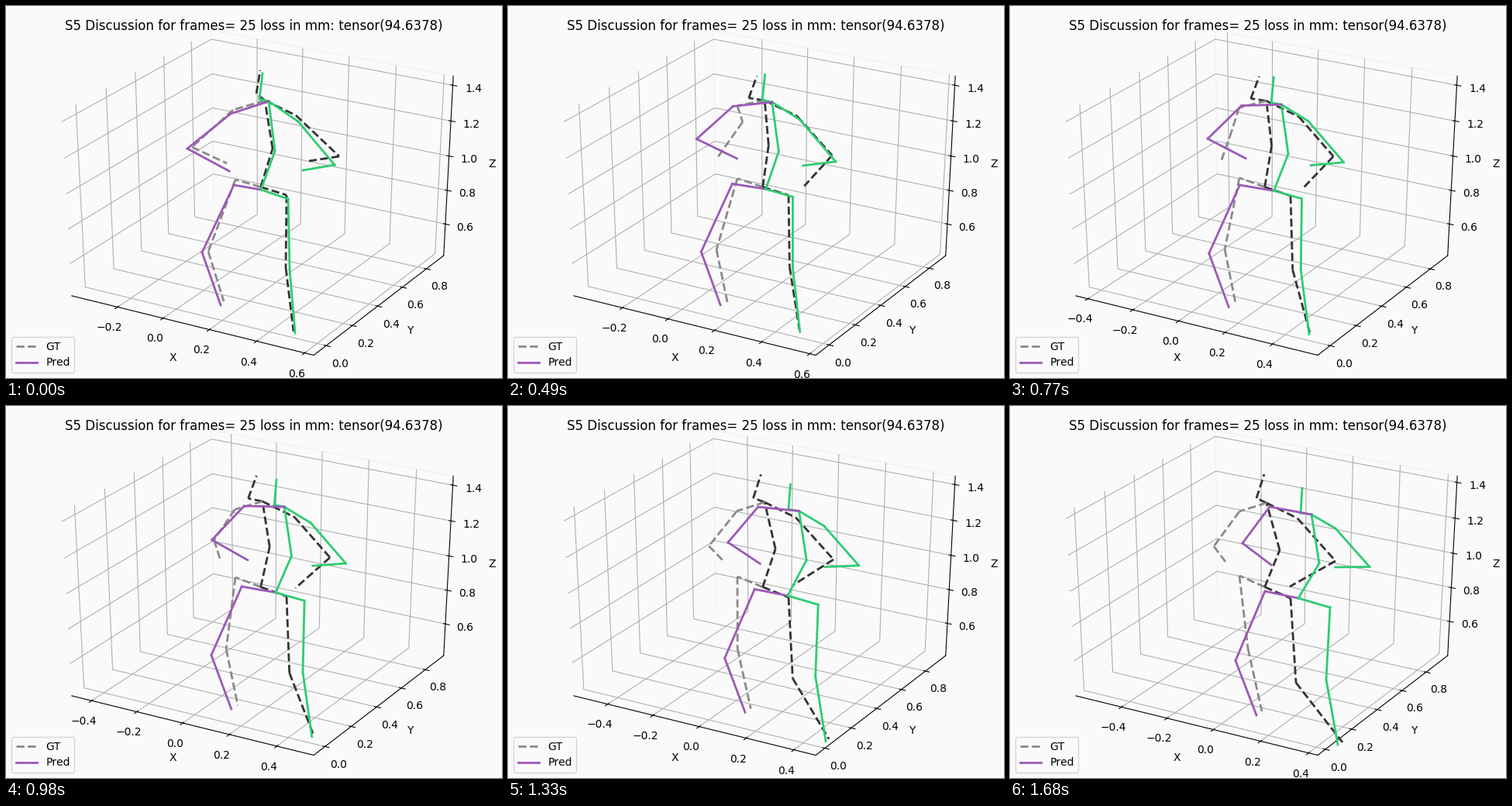
A matplotlib script for the animation above (1750 ms loop, 640 px wide and 480 px high).

```python
import numpy as np
import matplotlib.pyplot as plt
from matplotlib.animation import FuncAnimation
from matplotlib.lines import Line2D

W, H, FRAMES, STEP = 640, 480, 25, 70
PAPER, GRID, PANE = "#fafafa", "#b0b0b0", "#f2f2f2"
BLACK, GRAY, GREEN, PURPLE = "#333333", "#8a8a8a", "#2ecc71", "#9b59b6"
plt.rcParams["text.kerning_factor"] = 6

# Perspective camera looking at a unit cube
ELEV, AZIM, DIST = np.radians(30), np.radians(-60), 10
SE, CE, SA, CA = np.sin(ELEV), np.cos(ELEV), np.sin(AZIM), np.cos(AZIM)
RIGHT = np.array([-SA, CA, 0])
UP = np.array([-CA * SE, -SA * SE, CE])
TOWARD = np.array([CA * CE, SA * CE, SE])
ZOOM = DIST / 1.85
CENTER = np.array([W * 0.95 / 1.85, H - H * 0.95 / 1.85])

# Cube half size and label distances, in cube units
EDGE = 0.5 + 1 / 48
POINT = 48 / (72 * (W + H) / 100) / 12
TICK_PAD, LABEL_PAD = 11.5 * POINT, 25 * POINT
TICK_IN, TICK_OUT = 0.1 / 12, 0.2 / 12

# Signs of the corners each grid line runs through; the first is the axis edge
FOLDS = [
    [(0, -1, -1), (0, 1, -1), (0, 1, 1)],
    [(1, 0, -1), (-1, 0, -1), (-1, 0, 1)],
    [(1, 1, 0), (-1, 1, 0), (-1, -1, 0)],
]
TICK_DIM = [1, 0, 0]
TICK_FIFTHS = [range(-3, 5), range(-1, 6), range(2, 8)]

# Progress through the loop and two humps that start and end at zero
TIME = np.linspace(0, 1, FRAMES)[:, None]
LAG = 6.75 * TIME * (1 - TIME) ** 2
SWING = np.sin(np.pi * TIME * (2 - TIME)) ** 2


def move(start, drift, bend, hump=LAG):
    """Steady drift from a start point, bent aside by a hump."""
    return np.array(start) + TIME * drift + hump * bend


def spread(values, n):
    """Stretch a few vectors evenly over the n joints of a limb."""
    values = np.atleast_2d(values)
    at = np.linspace(0, 1, n)
    keys = np.linspace(0, 1, len(values))
    return np.column_stack([np.interp(at, keys, v) for v in values.T])


def limb(parent, starts, drifts, bends, hump=LAG):
    n = len(starts)
    return [parent] + [move(s, d, b, hump) for s, d, b
                       in zip(starts, spread(drifts, n), spread(bends, n))]


def project(points):
    p = np.atleast_2d(points)
    depth = DIST - p @ TOWARD
    return (CENTER[0] + W * ZOOM * (p @ RIGHT) / depth,
            CENTER[1] - H * ZOOM * (p @ UP) / depth)


def on_edge(signs, axis, value, size=EDGE):
    p = np.array(signs, float) * size
    p[axis] = value
    return p


# Data coordinates of the cube's middle
middle = move((0.1166, 0.428, 0.930), (-0.2, 0.036, 0), (0.046, -0.018, 0))
middle[:, 2:] -= 0.016 * TIME ** 6


def truth():
    root = move(CENTER, (0, 0), (0, 0))
    spine = limb(root, [(344, 184), (334, 122), (323, 113), (328, 83)],
                 [(4, 2), (-3, 3), (-5, 6), (0, 5)],
                 [(-9, -5), (-2, -1), (-11, 4), (-7, 6)])
    neck = spine[2]
    return [
        (GRAY, limb(root, [(296, 224), (261, 317), (281, 381)],
                    [(0, -5), (46, -4), (44, 13)], [(0, 0), (-11, -3)])),
        (BLACK, limb(root, [(362, 244), (361, 338), (371, 420)],
                     [(0, 4), (8, 19), (58, 14)], [(0, -1), (0, -7), (-12, -6)])),
        (BLACK, spine),
        (BLACK, limb(neck, [(374, 141), (430, 194), (391, 200)],
                     [(-3, 4), (-10, 6), (-30, 33)], [(0, 0), (-9, -3), (0, 23)])),
        (GRAY, limb(neck, [(293, 134), (240, 182), (285, 203)],
                    [(3, 2), (23, -1), (-7, -2)],
                    [(2, -6), (56, -32), (-14, -5)], SWING)),
    ]


def guess():
    root = move((329, 237), (43, 11), (-9, -4))
    spine = limb(root, [(347, 187), (339, 123), (327, 120), (331, 87)],
                 [(52, 16), (46, 19)], (-13, -4))
    neck = spine[2]
    return [
        (PURPLE, limb(root, [(294, 231), (253, 318), (277, 386)],
                      [(35, 8), (41, 13)], (-15, -4))),
        (GREEN, limb(root, [(364, 249), (366, 340), (373, 422)],
                     [(49, 11), (42, 13), (50, 15)], (-11, -6))),
        (GREEN, spine),
        (GREEN, limb(neck, [(377, 149), (424, 205), (383, 212)],
                     [(43, 9), (37, -4)], (-13, -5))),
        (PURPLE, limb(neck, [(290, 139), (234, 184), (288, 213)],
                      [(45, -9), (66, -7), (49, -8)], [(-13, -7), (-7, -14)])),
    ]


fig = plt.figure(figsize=(W / 100, H / 100), dpi=100, facecolor=PAPER)
ax = fig.add_axes([0, 0, 1, 1])
ax.set(xlim=(0, W), ylim=(H, 0))
ax.axis("off")


def stroke(xs, ys, color, width, z, style="-", cap="butt"):
    line = Line2D(xs, ys, color=color, lw=width, ls=style, zorder=z,
                  solid_capstyle=cap)
    ax.add_line(line)
    return line


def draw_box():
    back = np.array([(-1, 1, -1), (-1, 1, 1), (1, 1, 1)]) * EDGE
    stroke(*project(back), PANE, 1, 0)
    for axis, name in enumerate("XYZ"):
        signs = FOLDS[axis][0]
        ends = [on_edge(signs, axis, v) for v in (-EDGE, EDGE)]
        stroke(*project(ends), "black", 0.8, 2, cap="projecting")
        x, y = project(on_edge(signs, axis, 0, EDGE + LABEL_PAD))
        ax.text(x[0], y[0], name, ha="center", va="center", fontsize=10)


def make_ticks():
    ticks = []
    for axis, fifths in enumerate(TICK_FIFTHS):
        for n in fifths:
            label = f"{n / 5:.1f}".replace("-", "\u2212")
            ticks.append((
                axis, n / 5,
                stroke([], [], GRID, 0.8, 1),
                stroke([], [], "black", 0.8, 2, cap="projecting"),
                ax.text(0, 0, label, ha="center", va="top", fontsize=10),
            ))
    return ticks


def make_bones():
    return [(a, b, stroke([], [], color, 2, 3, style, "projecting"))
            for figure, style in ((truth(), "--"), (guess(), "-"))
            for color, joints in figure
            for a, b in zip(joints, joints[1:])]


def place_tick(tick, center):
    axis, value, grid, mark, label = tick
    t = value - center[axis]
    shown = abs(t) <= 0.5
    for artist in (grid, mark, label):
        artist.set_visible(shown)
    if not shown:
        return
    fold = FOLDS[axis]
    grid.set_data(*project([on_edge(s, axis, t) for s in fold]))
    inner, outer = on_edge(fold[0], axis, t), on_edge(fold[0], axis, t)
    dim = TICK_DIM[axis]
    inner[dim] -= TICK_IN * fold[0][dim]
    outer[dim] += TICK_OUT * fold[0][dim]
    mark.set_data(*project([inner, outer]))
    x, y = project(on_edge(fold[0], axis, t, EDGE + TICK_PAD))
    label.set_position((x[0], y[0]))


def update(i):
    for tick in ticks:
        place_tick(tick, middle[i])
    for a, b, line in bones:
        line.set_data([a[i, 0], b[i, 0]], [a[i, 1], b[i, 1]])
    return []


draw_box()
ticks = make_ticks()
bones = make_bones()
ax.text(W / 2, 31.2, "S5 Discussion for frames= 25 loss in mm: tensor(94.6378)",
        ha="center", va="baseline", fontsize=12)
ax.legend(handles=[Line2D([], [], color=GRAY, lw=2, ls="--", label="GT"),
                   Line2D([], [], color=PURPLE, lw=2, label="Pred")],
          loc="lower left", facecolor=PAPER)

anim = FuncAnimation(fig, update, frames=FRAMES, interval=STEP, repeat=True,
                     repeat_delay=0, blit=False)
plt.show()
```
